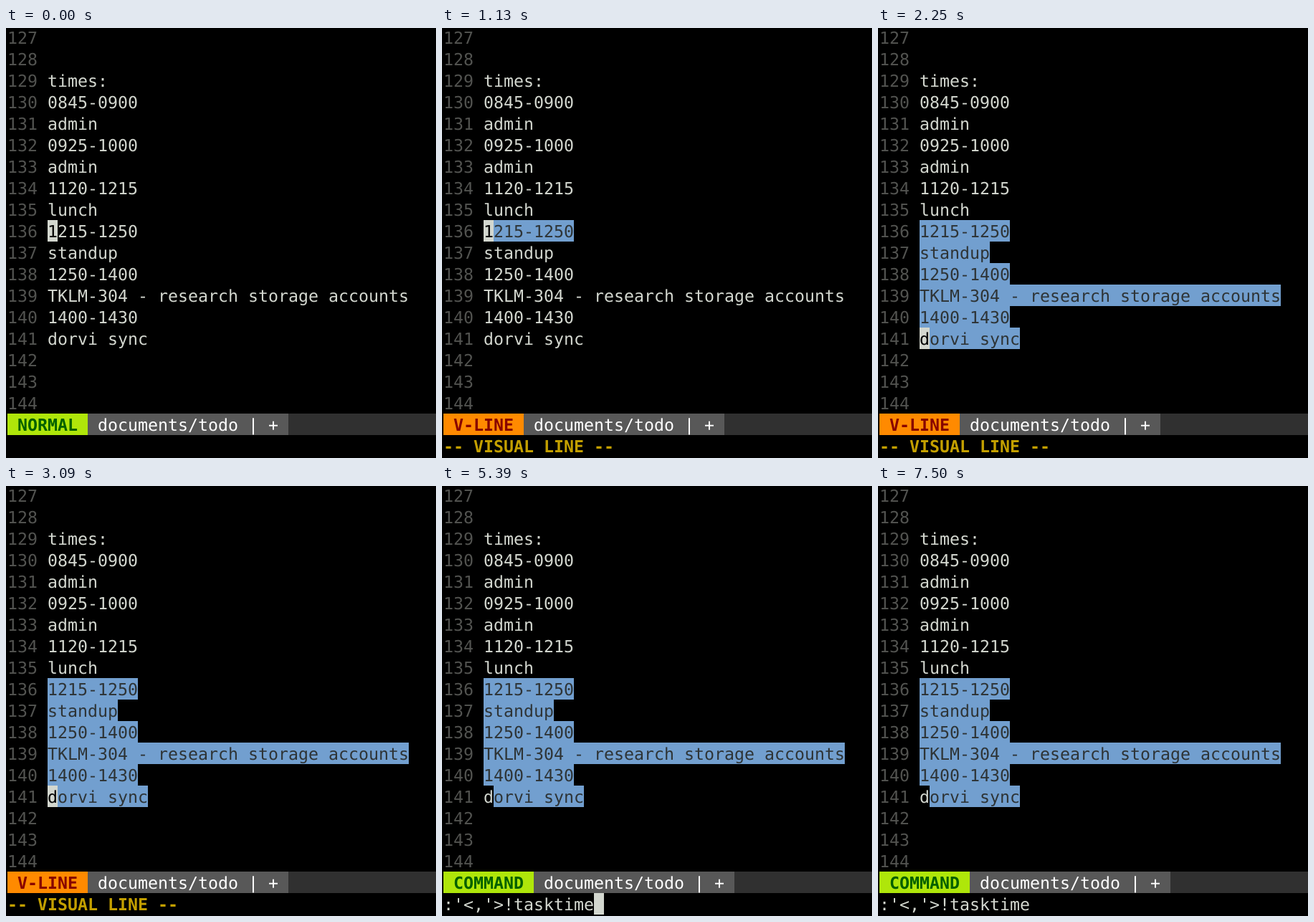
Write an HTML page that moves like this. It is 600x600 px and loops after 8000 ms.

```html
<!DOCTYPE html>
<html lang="en">
<head>
<meta charset="utf-8">
<title>Terminal editor</title>
<style>
  html, body { margin: 0; width: 100%; height: 100%; overflow: hidden; background: #000; }
  svg { display: block; width: 100vw; height: 100vh; }
  text {
    font: 23.25px "DejaVu Sans Mono", monospace;
    white-space: pre;
    text-rendering: geometricPrecision;
  }
  .bold { font-weight: bold; }
</style>
</head>
<body>
<svg id="screen" viewBox="0 0 600 600"></svg>
<script>
const NS = "http://www.w3.org/2000/svg";
const screen = document.getElementById("screen");
const LOOP = 8000, CELL_W = 14, CELL_H = 30, LEFT = 2, TOP = -2, BASELINE = 24;
const FIRST_LINE = 127, START = 136, END = 141, STATUS_ROW = 18, CMD_ROW = 19;

const C = {
  text: "#d3d7cf", num: "#525350", cursor: "#d3d7cf", black: "#000",
  sel: "#729fcf", selText: "#2e3436",
  file: "#585858", fileText: "#fff", bar: "#303030", message: "#c4a000"
};

const LINES = {
  129: "times:", 130: "0845-0900", 131: "admin", 132: "0925-1000", 133: "admin",
  134: "1120-1215", 135: "lunch", 136: "1215-1250", 137: "standup",
  138: "1250-1400", 139: "TKLM-304 - research storage accounts",
  140: "1400-1430", 141: "dorvi sync"
};

const MODES = {
  NORMAL: { bg: "#afe60a", fg: "#005f00" },
  "V-LINE": { bg: "#ff8a00", fg: "#870000" },
  COMMAND: { bg: "#afe60a", fg: "#005f00" }
};

const RANGE = ":'<,'>";
const command = (typed, cursor = true) =>
  ({ mode: "COMMAND", line: END, cmd: RANGE + typed, cursor });

// [start in ms, state]
const STEPS = [
  [0, { mode: "NORMAL", line: START }],
  [240, { mode: "V-LINE", line: START }],
  [2250, { mode: "V-LINE", line: END }],
  [3310, command("")],
  [4070, command("!")],
  [4150, command("!t")],
  [4410, command("!task")],
  [4520, command("!taskt")],
  [5390, command("!tasktime")],
  [5970, command("!tasktime", false)]
];

function add(tag, attrs, content = "") {
  const el = document.createElementNS(NS, tag);
  for (const key in attrs) el.setAttribute(key, attrs[key]);
  el.textContent = content;
  screen.append(el);
}

function fill(x, row, width, color) {
  add("rect", { x, y: TOP + row * CELL_H, width, height: CELL_H, fill: color });
}

function put(col, row, str, fg, bg, bold) {
  const x = LEFT + col * CELL_W;
  if (bg) fill(x, row, str.length * CELL_W, bg);
  const attrs = { x, y: TOP + row * CELL_H + BASELINE, fill: fg };
  if (bold) attrs.class = "bold";
  add("text", attrs, str);
}

function drawLine(n, state) {
  const row = n - FIRST_LINE, str = LINES[n] || "";
  put(0, row, String(n), C.num);
  if (!str) return;
  const selected = state.mode !== "NORMAL" && n >= START && n <= state.line;
  const fg = selected ? C.selText : C.text, bg = selected && C.sel;
  if (n !== state.line) return put(4, row, str, fg, bg);
  put(5, row, str.slice(1), fg, bg);
  if (state.mode === "COMMAND") put(4, row, str[0], C.text);
  else put(4, row, str[0], C.black, C.cursor);
}

function drawStatus(mode) {
  const label = ` ${mode} `, { fg, bg } = MODES[mode];
  fill(LEFT, STATUS_ROW, 600 - LEFT, C.bar);
  put(0, STATUS_ROW, label, fg, bg, true);
  put(label.length, STATUS_ROW, " documents/todo | + ", C.fileText, C.file);
}

function draw(state) {
  screen.replaceChildren();
  for (let row = 0; row < STATUS_ROW; row++) drawLine(FIRST_LINE + row, state);
  drawStatus(state.mode);
  if (state.mode === "V-LINE") put(0, CMD_ROW, "-- VISUAL LINE --", C.message, null, true);
  if (state.cmd) {
    put(0, CMD_ROW, state.cmd, C.text);
    if (state.cursor) put(state.cmd.length, CMD_ROW, " ", C.black, C.cursor);
  }
}

let shown = null;
const origin = performance.now();

function tick() {
  const t = (performance.now() - origin) % LOOP;
  const state = STEPS.findLast(([at]) => at <= t)[1];
  if (state !== shown) draw(shown = state);
  requestAnimationFrame(tick);
}
tick();
</script>
</body>
</html>
```
